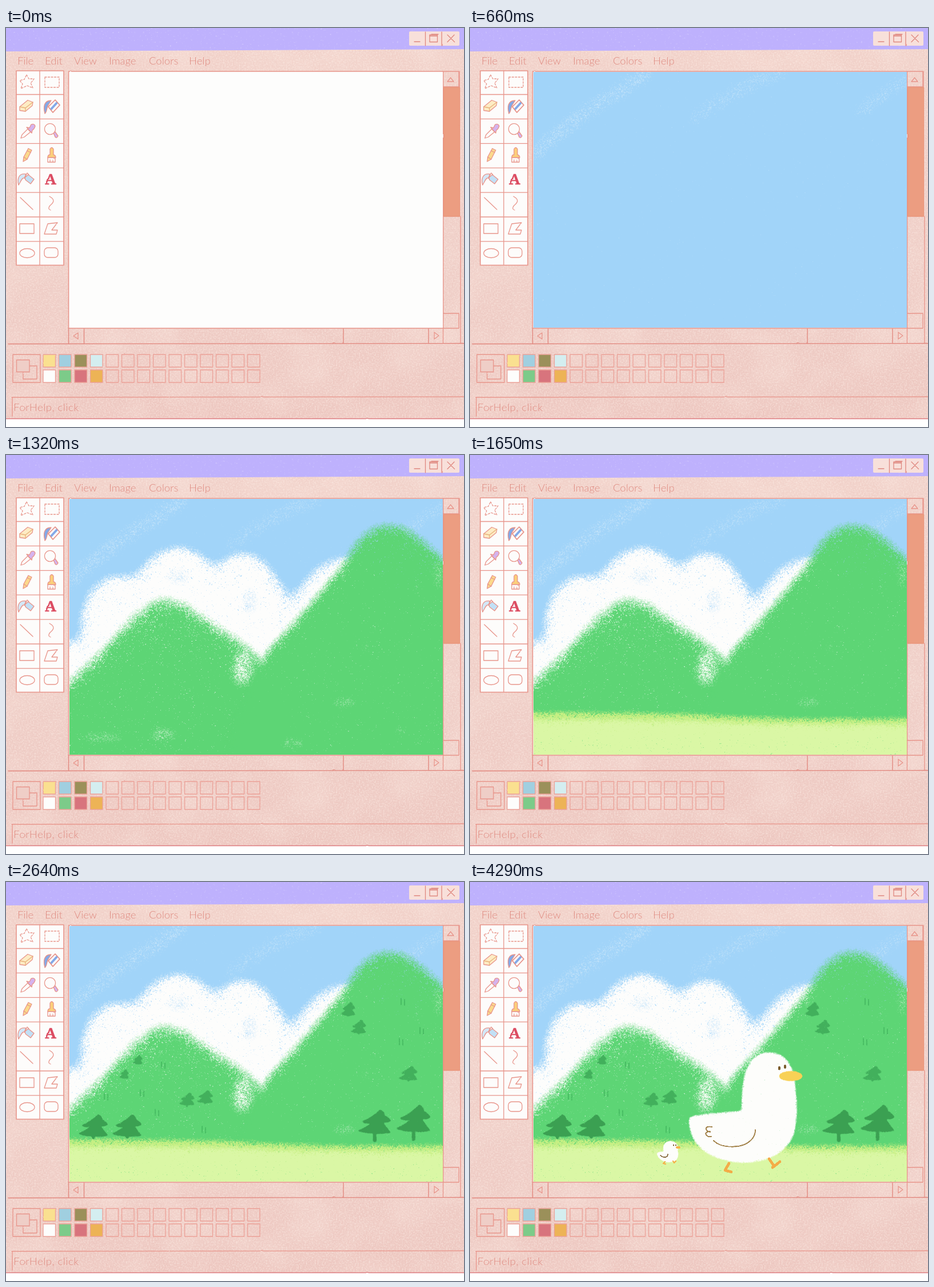
Recreate the animation shown at these times as an HTML page with a canvas. Size 801 by 699 pixels, loop 4.62 s.

```html
<!DOCTYPE html>
<html lang="en">
<head>
<meta charset="utf-8">
<title>Paint window</title>
<style>
html, body { margin: 0; width: 100%; height: 100%; overflow: hidden; background: #fff; }
svg, canvas { position: absolute; display: block; }
svg { left: 0; top: 0; }
canvas { left: 111px; top: 77px; }
text { font-family: Lato, "Open Sans", sans-serif; font-weight: 300; font-size: 18.5px; fill: #df8a80; }
</style>
</head>
<body>
<svg id="ui" width="801" height="699" viewBox="0 0 801 699">
  <defs>
    <linearGradient id="pink" x1="0" y1="0" x2="0" y2="1">
      <stop offset="0" stop-color="#f1d1c9"/>
      <stop offset=".6" stop-color="#efcec7"/>
      <stop offset="1" stop-color="#edc7c0"/>
    </linearGradient>
    <filter id="grain" x="0" y="0" width="1" height="1" color-interpolation-filters="sRGB">
      <feTurbulence type="fractalNoise" baseFrequency=".4" numOctaves="3" seed="4"/>
      <feColorMatrix values="0 0 0 0 1  0 0 0 0 .95  0 0 0 0 .92  0 0 0 1.1 -.45" result="specks"/>
      <feTurbulence type="fractalNoise" baseFrequency=".012" numOctaves="2" seed="9"/>
      <feColorMatrix values="0 0 0 0 .97  0 0 0 0 .88  0 0 0 0 .85  0 0 0 1.2 -.52" result="mottle"/>
      <feMerge><feMergeNode in="SourceGraphic"/><feMergeNode in="mottle"/><feMergeNode in="specks"/></feMerge>
    </filter>
    <filter id="dust" x="0" y="0" width="1" height="1" color-interpolation-filters="sRGB">
      <feTurbulence type="fractalNoise" baseFrequency=".3" numOctaves="3" seed="2"/>
      <feColorMatrix values="0 0 0 0 1  0 0 0 0 1  0 0 0 0 1  0 0 0 1.4 -.95"/>
      <feComposite operator="over" in2="SourceGraphic"/>
    </filter>
    <filter id="wobble" filterUnits="userSpaceOnUse" x="0" y="0" width="801" height="699" color-interpolation-filters="sRGB">
      <feTurbulence type="fractalNoise" baseFrequency=".05" numOctaves="2" seed="7"/>
      <feDisplacementMap in="SourceGraphic" scale="1.6" xChannelSelector="R" yChannelSelector="G"/>
    </filter>
  </defs>
  <rect y="30" width="801" height="655" fill="url(#pink)" filter="url(#grain)"/>
  <path d="M0 0H801V37L0 41Z" fill="#beb1fd" filter="url(#dust)"/>
  <g id="chrome" filter="url(#wobble)" fill="none" stroke="#e8958b" stroke-width="1.3" stroke-linejoin="round" stroke-linecap="round"></g>
</svg>
<canvas id="art" width="653" height="448"></canvas>
<script>
const start = performance.now();
const STEP = 330, STEPS = 14;

// ---- Window furniture ----
const path = (d, attrs = '') => `<path d="${d}" ${attrs}/>`;
const box = (x, y, w, h, attrs = '') => `<rect x="${x}" y="${y}" width="${w}" height="${h}" ${attrs}/>`;
const fill = (color, more = '') => `fill="${color}" ${more}`;
const label = (x, y, s) => `<text x="${x}" y="${y}" stroke="none">${s}</text>`;

function titleButtons() {
  return box(705, 6, 88, 25, fill('#f8e0da', 'stroke="none" rx="2"'))
    + `<g stroke="#df8880">${path('M733.5 7V31M762 7V31M714 24H724')}`
    + `${box(741, 12, 13.5, 12.5)}${path('M741 14H754M744 11H756M772 12L784.5 24.5M784 12L772 24.5')}</g>`;
}

function menu() {
  const items = { File: 20, Edit: 68, View: 119, Image: 180, Colors: 250, Help: 320 };
  return Object.entries(items).map(([s, x]) => label(x, 63.5, s)).join('');
}

function toolbox() {
  let out = box(18, 75, 83, 340.5, fill('#fdfcfb', 'stroke-width="1.6"')) + path('M59 75V415');
  for (let i = 0; i < 7; i++) out += path(`M18 ${116.5 + i * 42.9}H101`);
  return out
    + path('M36 82L40 89L49 89Q46 94 43 96L47 105L37 101L26 106L29 98L24 92L32 90Z', 'stroke-dasharray="3 2.5"')
    + box(68, 86, 25, 18, 'stroke-dasharray="3 2.5"')
    + path('M24 138L38 126.5L47 130L46 136L34 146L24 144.5Z', fill('#fdecc4'))
    + path('M24 138L34 140L47 130M34 140V146', 'stroke="#e8b27c"')
    + path('M68 150C65 138 66 127 79 127L74 135C71 139 72 147 68 150Z', fill('#83a9e8'))
    + path('M74 138L86 126L94 135L82 148Z', fill('#fdfcfb'))
    + path('M79 142L89 131', 'stroke="#83a9e8" stroke-width="4"')
    + path('M74 138L86 126L94 135L82 148Z')
    + path('M38 177L43 182L32 191L26 193L28 187Z', fill('#fdfcfb'))
    + path('M36 174L41 175L44 169Q50 167 51 172Q49 178 46 179L45 184Z', fill('#d5b3ee'))
    + path('M83 184L86 182L91 189Q89 194 86 191Z', fill('#d5b3ee'))
    + `<circle cx="77" cy="177" r="9.6" ${fill('#fdfcfb')}/>`
    + path('M39 211L45 214L37 230L30 234L31 226Z', fill('#fbd98b'))
    + path('M37 215L43 218M31 226L37 230')
    + path('M77 222V212Q80 207 83 212V222Q87 223 87 227H73Q73 222 77 222Z', fill('#fbd07a'))
    + path('M73 227H86V235H73ZM77 231V235M82 231V235', fill('#fdfcfb'))
    + path('M22 275C19 263 23 254 35 256L32 263C28 261 25 271 22 275Z', fill('#d3e8f8'))
    + path('M33 262L39 257L49 265L43 273L34 266Z', fill('#c2e0f6'))
    + path('M33 262L37 254L40 257')
    + `<text x="78" y="274" text-anchor="middle" stroke="#dc4c62" stroke-width=".6" style="font:700 26px 'Noto Serif','Liberation Serif',serif;fill:#dc4c62">A</text>`
    + path('M25 297L47 318M76 295C87 301 83 306 77 311Q72 317 78 319')
    + box(24, 343, 25, 17) + path('M67 361L73 343L90 341L80 354H90L88 361Z')
    + '<ellipse cx="37" cy="394.5" rx="13" ry="8"/>' + box(67, 385, 24, 17, 'rx="6"');
}

function scrollbars() {
  return box(109.5, 76, 655, 450, fill('#fdfdfc', 'stroke-width="1.6"'))
    + path('M765 76H792V103H765M795 330V552M793 76V104M765 526H792V500H765M764.5 526V552')
    + box(765.5, 104, 28, 226, fill('#ec9d81', 'stroke="#ea957b"'))
    + path('M772 94L777.5 87L783 94ZM126 534V545L118 539.5ZM749 533V545L757 539Z')
    + path('M109.5 526V552M136.5 527V552M590 527V552M739 527V552M4 553.5L801 552.5', 'stroke="#e1857c"');
}

function palette() {
  const colors = ['#fae090', '#fdfdfc', '#a0cfe0', '#7ccb89', '#9b905a', '#d8747d', '#d4eef0', '#edb356'];
  let out = box(12, 572, 48, 49) + box(30, 592, 24, 23) + box(18.5, 581.5, 22.5, 21, fill('#efcec7'));
  for (let i = 0; i < 28; i++) {
    const x = 65 + (i >> 1) * 27.5, y = 572 + (i % 2) * 27;
    out += box(x, y, 21.5, 22, (colors[i] ? fill(colors[i]) : '') + 'stroke="#eba198"');
  }
  return out;
}

function statusBar() {
  return path('M10 647L801 646M11 647V680') + path('M0 684.5H801', 'stroke="#dd7c80"')
    + `<g letter-spacing=".5">${label(13, 670.5, 'ForHelp, click')}</g>`;
}

document.getElementById('chrome').innerHTML =
  titleButtons() + menu() + toolbox() + scrollbars() + palette() + statusBar();

// ---- Crayon engine ----
const art = document.getElementById('art'), ctx = art.getContext('2d');
const W = art.width, H = art.height, LEFT = 111, TOP = 77;

let seed = 11;
function random() {
  seed = (seed + 0x6D2B79F5) | 0;
  let t = Math.imul(seed ^ (seed >>> 15), 1 | seed);
  t = (t + Math.imul(t ^ (t >>> 7), 61 | t)) ^ t;
  return ((t ^ (t >>> 14)) >>> 0) / 4294967296;
}

// Paper tooth: short fibres plus a coarse patchiness, centred on 0.5.
const tooth = (() => {
  const n = W * H, white = Float32Array.from({ length: n }, random);
  const cell = 14, cols = Math.ceil(W / cell) + 2;
  const coarse = Float32Array.from({ length: cols * (Math.ceil(H / cell) + 2) }, random);
  const mix = (a, b, k) => a + (b - a) * k;
  return Float32Array.from({ length: n }, (_, i) => {
    const x = (i % W) / cell, y = Math.floor(i / W) / cell;
    const c = Math.floor(y) * cols + Math.floor(x), fx = x % 1, fy = y % 1;
    const patch = mix(mix(coarse[c], coarse[c + 1], fx), mix(coarse[c + cols], coarse[c + cols + 1], fx), fy);
    const fibre = white[i] + white[(i + 1) % n] + white[(i + W) % n] + white[(i + W + 1) % n];
    return fibre / 4 + (patch - .5) * .14;
  });
})();

const layers = [];

// The drawn alpha is pigment density; the tooth decides where it sticks.
function chalk(at, color, blur, grain, draw) {
  const canvas = document.createElement('canvas');
  canvas.width = W; canvas.height = H;
  const g = canvas.getContext('2d', { willReadFrequently: true });
  g.translate(-LEFT, -TOP);
  g.filter = `blur(${blur}px)`;
  g.lineCap = g.lineJoin = 'round';
  draw(g);
  const img = g.getImageData(0, 0, W, H), d = img.data, shift = layers.length * 7919;
  const rgb = [1, 3, 5].map(k => parseInt(color.slice(k, k + 2), 16));
  for (let i = 0; i < W * H; i++) {
    const p = i * 4, b = d[p + 3] / 255;
    if (!b) continue;
    const v = b * (6 * grain * (tooth[(i + shift) % (W * H)] - .5) + 2.4) - .4;
    d[p] = rgb[0]; d[p + 1] = rgb[1]; d[p + 2] = rgb[2];
    d[p + 3] = Math.max(0, Math.min(1, v)) * 255;
  }
  g.putImageData(img, 0, 0);
  layers.push({ at, canvas });
}

const shade = a => `rgba(0,0,0,${a})`;
const fade = (g, y0, a0, y1, a1) => {
  const f = g.createLinearGradient(0, y0, 0, y1);
  f.addColorStop(0, shade(a0)); f.addColorStop(1, shade(a1));
  return f;
};
const flood = a => g => { g.fillStyle = shade(a); g.fillRect(0, 0, 900, 700); };
const shape = d => g => g.fill(new Path2D(d));
const line = (d, w) => g => { g.lineWidth = w; g.stroke(new Path2D(d)); };
const oval = (g, x, y, rx, ry) => { g.beginPath(); g.ellipse(x, y, rx, ry, 0, 0, 7); g.fill(); };
const ovals = (list, a = 1) => g => { g.fillStyle = shade(a); list.forEach(o => oval(g, ...o)); };
const streaks = list => g => list.forEach(([d, w, a]) => { g.strokeStyle = shade(a); line(d, w)(g); });

const LEAVES = new Path2D('M36 0Q44 4 43 9Q51 13 53 18Q46 21 40 20Q46 28 53 36Q40 39 28 37Q12 38 0 33Q14 28 22 21Q13 23 6 19Q24 12 36 0Z');
const trees = list => g => list.forEach(([x, y, w, h, trunk]) => {
  g.save(); g.translate(x, y); g.scale(w / 53, h / 38); g.fill(LEAVES); g.restore();
  g.fillRect(x + w * .47, y + h * .9, w * .09, h * .1 + trunk);
});

// ---- Painting ----
chalk(1, '#99d0f9', 0.1, .7, flood(.53));
chalk(1, '#fdfdfc', 16, .75, streaks([
  ['M90 225Q190 150 340 70', 60, .36],
  ['M110 360Q300 225 510 70', 44, .36],
  ['M100 495Q280 345 400 262T570 170', 52, .4],
  ['M190 540Q340 400 460 330T720 150', 46, .33],
  ['M325 540Q420 430 650 270', 40, .32],
  ['M455 540Q530 460 660 355', 38, .42],
  ['M640 540Q700 450 790 340', 40, .42]
]));
chalk(1, '#fdfdfc', 7, .8, streaks([
  ['M290 225Q400 140 505 72', 15, .34],
  ['M338 532L372 500', 16, .45],
  ['M465 532L545 448', 18, .62],
  ['M645 530L660 512', 14, .45],
  ['M768 215V260', 22, .75]
]));

chalk(2, '#a1d4f9', 0.1, .5, flood(1));
chalk(2, '#e2f1fb', 14, .9, streaks([
  ['M110 225Q180 155 310 80', 34, .27],
  ['M390 160Q460 105 550 75', 34, .24],
  ['M680 150Q730 105 780 85', 34, .23]
]));

chalk(3, '#fdfdfc', 14, .7, shape('M60 332Q116 326 136 344C134 262 150 220 192 218Q214 216 232 220C250 186 269 168 300 167C332 168 350 186 363 212C378 188 397 177 415 177C449 177 474 222 497 270C520 230 546 186 603 184C642 185 660 232 673 296C694 236 722 206 810 198V600H60Z'));
chalk(3, '#bfe1fa', 9, .9, ovals([
  [335, 375, 14, 22], [322, 405, 12, 10], [285, 497, 18, 14], [245, 405, 14, 10],
  [435, 380, 16, 14], [700, 358, 22, 16], [600, 472, 14, 22], [510, 522, 28, 9],
  [300, 213, 25, 15], [425, 255, 16, 28], [125, 525, 20, 14]
], .3));
chalk(3, '#a1d4f9', 6, 1, ovals([[756, 526, 22, 8]], .8));

const HILL = '#5dd575';
chalk(4, HILL, 16, .6, g => {
  g.fillStyle = fade(g, 250, .68, 410, 1);
  shape('M40 470Q150 374 200 316Q236 270 264 257Q290 248 318 270Q370 306 432 350L500 450V620H40Z')(g);
});
chalk(4, '#f0fbf0', 12, .8, ovals([[414, 372, 20, 36]], .5));
chalk(4, HILL, 14, .55, g => {
  g.fillStyle = fade(g, 115, .72, 210, 1);
  shape('M395 490Q430 414 456 352Q488 320 518 286Q562 236 598 190Q614 144 646 130Q680 116 712 140Q740 166 810 226V620H395Z')(g);
});
chalk(4, '#e6f8e6', 9, .9, ovals([
  [408, 384, 14, 22], [629, 338, 9, 18], [592, 434, 26, 11], [690, 482, 13, 12],
  [500, 505, 26, 12], [275, 490, 28, 16], [170, 495, 40, 12], [755, 210, 10, 34]
], .27));

chalk(5, '#c6ef83', 9, .75, shape('M60 455Q300 453 450 461T830 464V490H60Z'));
chalk(5, '#daf7a5', 10, .6, shape('M60 468Q300 466 450 472T830 475V600H60Z'));

chalk(6, '#3ba052', .9, .45, trees([
  [126, 407, 52, 39, 4], [185, 407, 52, 39, 3], [615, 399, 58, 42, 14], [682, 390, 60, 48, 15]
]));
chalk(7, '#42b05c', .9, .55, trees([
  [585, 210, 26, 24, 2], [602, 241, 28, 24, 2], [198, 328, 17, 16, 1], [221, 303, 18, 16, 1],
  [302, 369, 28, 22, 3], [333, 365, 29, 22, 2], [686, 322, 34, 25, 2]
]));
chalk(8, '#48bd63', .4, .6, g => [
  [275, 321], [238, 370], [175, 376], [264, 404], [346, 434], [694, 210], [727, 261], [691, 280]
].forEach(([x, y]) => line(`M${x - 3} ${y - 6}V${y + 5}M${x + 3} ${y - 4}V${y + 6}`, 1.4)(g)));

chalk(9, '#fdfdfb', 2.5, .45, shape('M384 415C387 407 430 407 476 401C476 353 479 300 525 299C558 301 567 333 568 358Q574 400 567 437C556 474 520 491 475 491C420 487 383 463 384 415Z'));
chalk(9, '#d9f3da', 3, 1, streaks([['M398 411L468 403', 4, .35]]));
chalk(10, '#f8d156', 1.3, .4, ovals([[561, 340, 20, 8.5]]));
chalk(11, '#7a5c2c', .5, .4, ovals([[541, 326, 1.9, 3.5], [551, 323.5, 1.9, 3.5]]));
chalk(11, '#a3834b', .4, .6, line('M426 453C438 466 467 466 482 459Q499 450 499 434M423 429Q412 427 413 433Q414 437 420 438M420 437Q410 438 413 443Q416 447 422 446', 1.7));
chalk(12, '#f3ac48', .7, .4, line('M453 493L446 505L457 508M523 485L532 498L542 490M532 498L529 500', 4.6));

chalk(13, '#fdfdfb', 1, .3, shape('M327 475Q333 472 339 473C336 460 342 454 351 454C362 455 365 463 363 471Q366 482 359 488Q350 493 339 489Q328 484 327 475Z'));
chalk(13, '#f5b24c', .5, .3, g => {
  oval(g, 364, 465, 4, 1.9);
  line('M341 490L338 493L342 494M355 489L357 492L360 489', 2)(g);
});
chalk(13, '#806235', .4, .4, g => {
  oval(g, 356, 461, 1, 1.5);
  oval(g, 360, 461, 1, 1.5);
  line('M333 479Q337 483 342 482Q346 481 346 477', 1.3)(g);
});

// ---- Playback ----
let shown = -1;
function render(t) {
  const step = Math.floor(t / STEP) % STEPS;
  if (step === shown) return;
  shown = step;
  ctx.fillStyle = '#fdfdfc';
  ctx.fillRect(0, 0, W, H);
  for (const { at, canvas } of layers) if (at <= step) ctx.drawImage(canvas, 0, 0);
}
function tick() {
  render(performance.now() - start);
  requestAnimationFrame(tick);
}
render(0);
requestAnimationFrame(tick);
</script>
</body>
</html>
```
